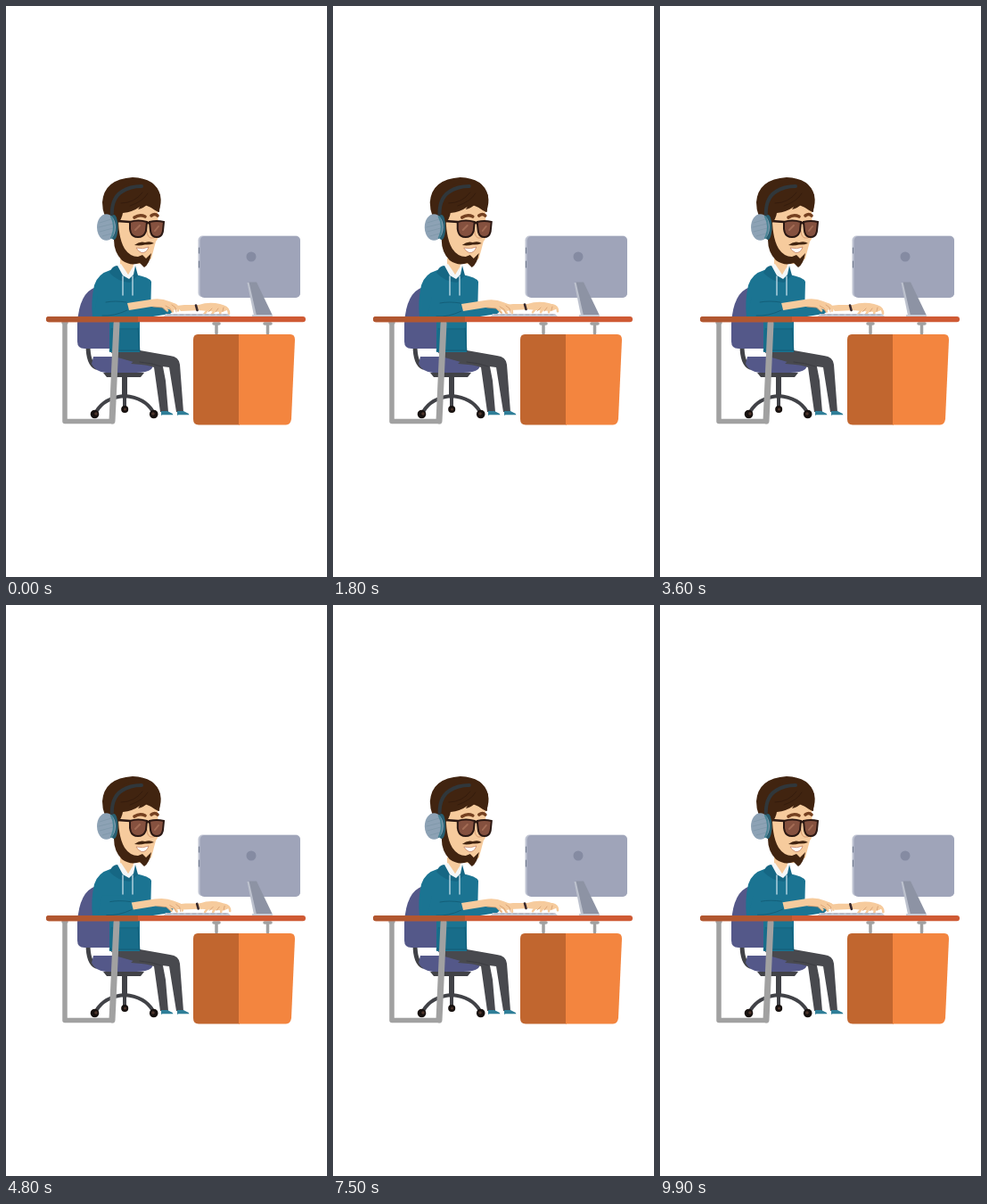
Recreate the animation shown at these times as an HTML page. Size 360 by 640 pixels, loop 10 s.

```html
<!DOCTYPE html>
<html lang="en">
<head>
<meta charset="utf-8">
<title>Typing at the desk</title>
<style>
html, body { margin: 0; width: 100%; height: 100%; overflow: hidden; background: #fff; }
svg { display: block; width: 100%; height: 100%; }
.line { fill: none; stroke-linecap: round; stroke-linejoin: round; }
.skin { fill: #f6cb9d; }
.skinline { stroke: #f6cb9d; }
.crease { stroke: #cf9468; stroke-width: .7; }
.dark { fill: #414247; }
.teal { fill: #1b7492; }
.fold { stroke: #125a73; stroke-width: .8; }
.hair { fill: #412410; }
.steel { stroke: #a1a1a1; }
</style>
</head>
<body>
<svg viewBox="0 0 360 640">
  <!-- chair -->
  <g>
    <path class="line" d="M92 380Q92 401 101 405" stroke="#414247" stroke-width="5"/>
    <path fill="#545889" d="M101 315Q82 321 80 356V376Q80 384 88 384H119V315Z"/>
    <path fill="#545889" d="M98 393H164Q168 400 163 407Q158 411 146 411H112Q100 410 96 401Z"/>
    <path class="dark" d="M109 411H155L151 416H113ZM130 416H136V439H130Z"/>
    <path class="line" d="M133 437Q110 439 101 455M133 437Q156 439 165 455M133 438V450" stroke="#414247" stroke-width="4"/>
    <g fill="#17110f"><circle cx="99.500" cy="457.500" r="4.800"/><circle cx="133.200" cy="452" r="4"/><circle cx="165.700" cy="457.500" r="4.800"/></g>
    <g fill="#4d352c"><circle cx="101" cy="457" r="1.800"/><circle cx="133.500" cy="452" r="1.500"/><circle cx="165" cy="457" r="1.800"/></g>
  </g>

  <!-- legs -->
  <path fill="#48494e" d="M116 386H150L184 392Q194 393 195 402L199 455H191L183 405L150 401L122 393Z"/>
  <path fill="#48494e" d="M150 392L174 394L179 420L182 455H173L166 405Q160 402 140 401Z"/>
  <path class="line" d="M150 399Q163 400 174 404" stroke="#3b3c41" stroke-width="1"/>
  <g fill="#2f7e98">
    <path d="M174 454H181L187 457V459H174ZM192 454H199L205 457V459H192Z"/>
  </g>
  <path class="line" d="M175 458.500H187M193 458.500H205" stroke="#c7dce2" stroke-width="1"/>

  <!-- far arm -->
  <g id="far">
    <path id="reach" class="skin" d="M167 334Q178 328 189 329L213 333L219 335L217 343L190 344L166 342Z"/>
    <path id="wrist" class="skin" d="M191 336L200 335L218 335L219 341L196 342Z"/>
    <path class="skin" d="M216 335Q228 331 240 334Q249 336 250 340L243 343L226 342L216 341Z"/>
    <g id="farFingers" class="line skinline" stroke-width="2.600">
      <path d="M226 340L222 345M234 340L231 345M241 338L240 345M244 337Q250 338 250 344"/>
    </g>
    <path class="line crease" d="M227 343L231 339M235 343L238 339M243 342L244 338"/>
    <path class="line" d="M213 335.500L214.500 341" stroke="#37282c" stroke-width="2.600"/>
  </g>

  <!-- torso -->
  <path class="skin" d="M128 283H143V300L137 306L128 298Z"/>
  <path class="teal" d="M117 296Q103 300 99 313Q95 330 97 349H116V388H150V349H162L163 309Q161 304 145 301L137 306L126 297Z"/>
  <path fill="#f4f7f8" d="M122 292L129 289L137 301L142 290L145 301L138 308L128 303Z"/>
  <path class="skin" d="M130 286H142V293L137 301Z"/>
  <path fill="#166784" d="M116 299Q119 291 125 291L131 302L138 306L143 301L145 291L148 302L139 310Q125 309 116 299Z"/>
  <path fill="#186d8a" d="M117 363H148L150 387H116Z"/>
  <path class="line fold" d="M118 362H148M148 361L150 387M116 386H150"/>
  <path class="line" d="M131 303V324M142 303V324" stroke="#afd0dd" stroke-width="1.500"/>
  <path class="teal" d="M149 348L160 335L186 337Q190 341 184 345L165 348Z"/>

  <!-- near arm -->
  <g id="near">
    <path class="teal" d="M103 325H126L138 331L139 340L134 347H98Z"/>
    <path class="line fold" d="M112 332Q122 330 135 332M108 347Q121 348 136 341"/>
    <path class="skin" d="M136 333Q149 331 162 329Q174 327 183 331L191 334Q195 337 193 340L186 341L176 338L163 337L138 341Z"/>
    <g id="nearFingers" class="line skinline" stroke-width="2.600">
      <path d="M175 336L181 342M182 336L187 343M188 335Q193 337 193 342"/>
    </g>
    <path class="line crease" d="M165 337L175 338L181 343M179 336L184 339L186 343M186 335L190 338L191 343"/>
  </g>

  <!-- head -->
  <g id="head">
    <path class="hair" d="M119 246Q108 237 108 220Q110 194 142 192Q168 193 173 212L172 231L151 224L132 229L126 249Z"/>
    <path class="skin" d="M124 232L151 221L170 229L171 250Q172 260 168 264L163 283Q154 292 143 288L128 276L122 252Z"/>
    <path class="hair" d="M121 243L126 243Q127 262 133 272Q139 281 148 281L153 279L157 283L163 277Q161 289 155 293L150 288Q140 292 130 285Q121 276 121 262Z"/>
    <path fill="#fff" stroke="#b86c50" stroke-width=".6" d="M146 271Q154 273 160 270Q158 277 152 276.500Q148 275 146 271Z"/>
    <path class="hair" d="M144 268Q150 263 156 265Q162 263 166 266Q161 268 156 267.500Q150 269 144 268Z"/>
    <path class="line" d="M144 237Q150 233 156 236M163 235Q167 232 170 235" stroke="#744020" stroke-width="3.600"/>
    <path class="line" d="M158 252Q158 258 162 260Q166 261 168 258" stroke="#d69a70" stroke-width="1"/>
    <path class="line" d="M125 241L139 242M156 244Q159 242 162 244" stroke="#2b1813" stroke-width="2.600"/>
    <g fill="#85513f" stroke="#2b1813" stroke-width="2">
      <path d="M139 242Q148 239 158 242L157 252Q155 259 148 259Q140 259 139 250Z"/>
      <path d="M161 242Q169 240 177 242L176 252Q175 259 169 259Q163 259 162 252Z"/>
    </g>
    <path class="line" d="M145 251L150 246M167 252L171 247" stroke="#a36c55" stroke-width="2"/>
    <path class="hair" d="M116 229Q117 203 145 197Q166 198 173 212Q175 221 171 231Q164 228 159 222Q154 227 148 228L150 225Q142 231 131 232Q130 239 125 244L120 243Z"/>
    <path class="line" d="M129 221Q144 221 153 209M139 224Q154 219 159 210" stroke="#351c0d" stroke-width="1"/>
    <path class="line" d="M119 239Q117 216 130 208Q139 202 152 202" stroke="#30373b" stroke-width="4"/>
    <ellipse cx="121" cy="248" rx="4.500" ry="14" fill="#285e70"/>
    <ellipse cx="112.500" cy="248" rx="10.500" ry="14.800" fill="#8da2b5"/>
    <path class="line" d="M105 243L118 239M104 248L120 244M105 253L120 249M108 258L119 255" stroke="#7b95a6" stroke-width=".7"/>
    <path class="line" d="M118 236Q124 247 118 260" stroke="#4a8596" stroke-width="2"/>
  </g>

  <!-- monitor and keyboard -->
  <rect x="215.500" y="257.500" width="114.500" height="69" rx="5" fill="#bfc4d2"/>
  <rect x="217.500" y="258" width="112.500" height="69" rx="5" fill="#9fa4b9"/>
  <path class="line" d="M216.500 271V277M216.500 286V293" stroke="#747d92" stroke-width="1.200"/>
  <circle cx="275" cy="281" r="5.500" fill="#858ba2"/>
  <path fill="#bcc1cd" d="M270.500 310H275L284 347H278Z"/>
  <path fill="#8d93a4" d="M272.500 309.500H281L299 347H281Z"/>
  <path fill="#c7cbd5" d="M179 345H249L252 348H177ZM276 346H299V348H276Z"/>
  <path class="line" d="M181 346H247" stroke="#9a9fae" stroke-width=".7" stroke-dasharray="4 3"/>

  <!-- desk -->
  <path class="line steel" d="M66 356V465.500H119" stroke-width="5.500"/>
  <path class="line steel" d="M124 356L119 465" stroke-width="7"/>
  <path class="line steel" d="M64 355H68M233 356H239M236 357V367M290 356H297M293.500 357V367" stroke-width="3.500"/>
  <rect x="45" y="348" width="291" height="6.200" rx="3" fill="#cf5a34"/>
  <path fill="#b15730" d="M48 348H148V354.200H48A3 3 0 0 1 48 348Z"/>
  <path fill="#c1662f" d="M215 368H262V469.500H216Q210 469.500 210 463V374Q210 368 215 368Z"/>
  <path fill="#f3853f" d="M261 368H319Q324 368 324 374L320 463Q319 469.500 314 469.500H261Z"/>
</svg>
<script>
const LOOP = 10000, STROKES = 14, STEP = 100;
const part = id => document.getElementById(id);
const move = (id, x, y = 0) => part(id).setAttribute("transform", `translate(${x} ${y})`);
const show = (id, on) => part(id).setAttribute("visibility", on ? "visible" : "hidden");

function draw(now) {
  const t = Math.floor(now % LOOP / STEP) * STEP;
  const phase = t * STROKES / LOOP % 1;
  const wave = shift => Math.sin(2 * Math.PI * (phase - shift));
  const forward = (1 - Math.cos(2 * Math.PI * phase)) / 2;
  const crossed = phase > .25 && phase < .46;

  move("head", Math.max(0, wave(.15)));
  move("near", 8 * forward, forward);
  move("far", crossed ? -8 : 2 * forward, crossed ? -1.5 : -forward);
  move("nearFingers", 0, .7 * wave(.2));
  move("farFingers", 0, -.8 * wave(.3));
  show("near", !crossed);
  show("wrist", !crossed);
  show("reach", crossed);
  requestAnimationFrame(draw);
}
requestAnimationFrame(draw);
</script>
</body>
</html>
```
